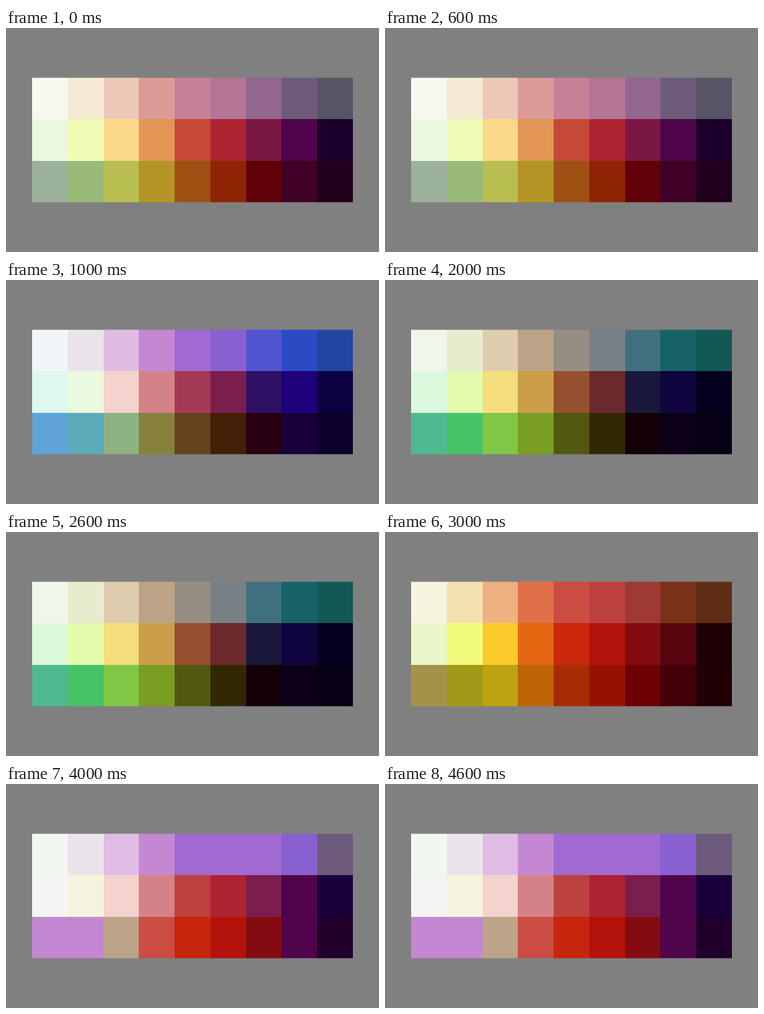
These frames come from a looping animation (500 by 300 pixels, 5 s). An HTML page with a canvas:

```html
<!DOCTYPE html>
<html lang="en">
<head>
<meta charset="utf-8">
<title>Palette cycle</title>
<style>
html, body { margin: 0; width: 100%; height: 100%; overflow: hidden; background: #808080; }
canvas { display: block; }
</style>
</head>
<body>
<canvas id="stage" width="500" height="300"></canvas>
<script>
const ctx = document.getElementById('stage').getContext('2d');
const HOLD = 1000, COLS = 9;
const rowEdges = [66.67, 122, 178, 233.33];

// One palette per second, three rows of nine colours each.
const palettes = [
  `f7f8f0 f4ead4 edc8b8 db9b98 c68197 b47594 93668e 6e5b7b 575466
   ebf7e0 f0fbb5 fad98a e39656 c54936 ae2331 7a1743 4f044b 1c002b
   9db29c 9aba78 b8be4f b39425 a05013 8e2404 610009 400025 20001c`,
  `f0f6f9 ebe4ea e0bbe0 c488d2 a06ad2 8960d0 5155d0 2a4bc4 2245a2
   def8f0 e9fadf f4d2cd d38287 a33b56 7b1e4d 2f1166 1e007b 0c0041
   60a3d6 5cabba 8db282 87813c 66431c 451f08 270012 19003b 0c002d`,
  `eff7ec e9ebcf ddcdae bda388 978e83 798085 40707f 166267 125854
   daf9dc e4fbad f4dd7a cc9e4a 964f2f 6b292d 1a183a 10053f 04001e
   4fb98f 48c268 80c745 7a9e22 525811 332804 150008 0c0019 070014`,
  `f6f3df f3e2af eeb182 e07049 cb4c42 bd413f 9e3935 793118 5f2e14
   e9f7ca f2fa7c fbc92c e56611 cb270b b3130a 840b0f 57040f 1e0007
   a5914a a19a18 bea311 bd6507 a52c04 951200 6d0001 430008 200005`,
  `f2f7f2 ebe5eb e0bbe3 c488d2 a06ad2 a06ad2 a06ad2 8960d0 6e5b7b
   f3f5f5 f5f3de f4d2cd d38287 bd413f ae2331 7b1e4d 4f044b 1a003b
   c488d2 c488d2 bda388 cb4c42 c7250e b3130a 840b0f 4f044b 20002a`
].map(text => text.split(/\s+/));

const colEdge = i => Math.round(35 + 430 * i / COLS);

function draw(palette) {
  ctx.fillStyle = '#808080';
  ctx.fillRect(0, 0, 500, 300);
  palette.forEach((colour, i) => {
    const col = i % COLS, row = Math.floor(i / COLS);
    const x = colEdge(col), y = rowEdges[row];
    ctx.fillStyle = '#' + colour;
    ctx.fillRect(x, y, colEdge(col + 1) - x, rowEdges[row + 1] - y);
  });
}

function tick() {
  draw(palettes[Math.floor(performance.now() / HOLD) % palettes.length]);
  requestAnimationFrame(tick);
}
tick();
</script>
</body>
</html>
```
